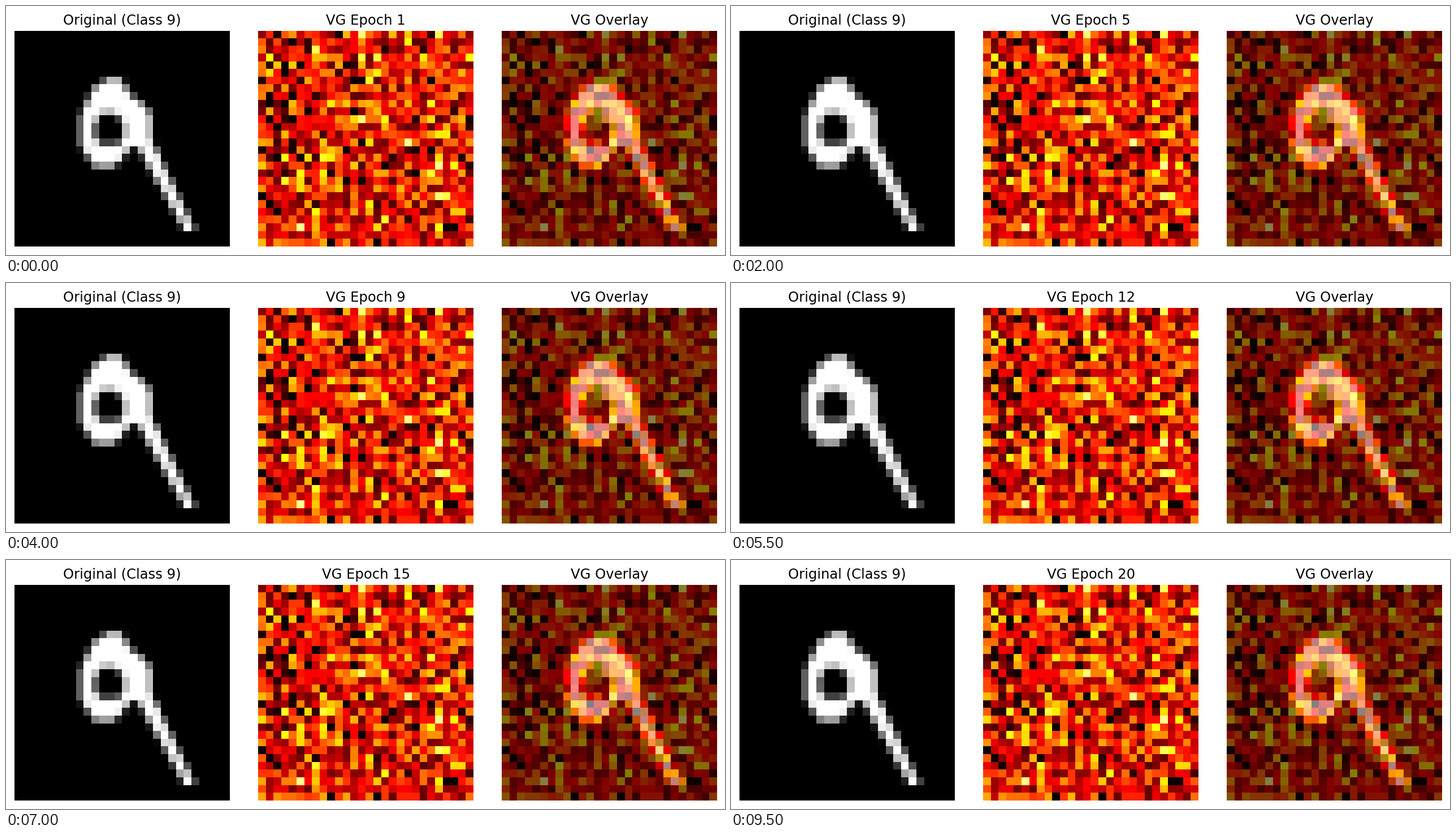
Recreate the animation shown at these times as a matplotlib script. Size 1272 by 440 pixels, loop 10 s.

```python
import numpy as np
import matplotlib.pyplot as plt
from matplotlib.animation import FuncAnimation
from matplotlib.path import Path

WIDTH, HEIGHT, DPI = 1272, 440, 100
EPOCHS, INTERVAL = 20, 500
GRID = 28
PANEL_X, PANEL_TOP, PANEL_SIZE = (14.9, 446.3, 877.2), 44.2, 381
LEVELS = 36  # colour steps of the gradient map

# Key points of the handwritten nine, in grid cells.
OUTLINE = [(12.3, 6.2), (13.8, 6.2), (15, 8.3), (17, 9.8), (17.8, 11),
           (17.7, 14), (23.5, 26), (22.2, 26), (16, 15), (15, 15.2),
           (13.7, 17), (12.8, 17.6), (10.4, 17.6), (8.65, 15), (8.65, 11),
           (10.3, 7.5)]
HOLE = [(11.3, 10.7), (13, 10.7), (14.25, 12), (14.25, 13.8), (13.6, 14.75),
        (11.1, 14.75), (10.4, 13.8), (10.4, 12)]


def coverage(points, samples=8):
    """Share of each grid cell that lies inside a polygon."""
    axis = (np.arange(GRID * samples) + 0.5) / samples
    x, y = np.meshgrid(axis, axis)
    inside = Path(points).contains_points(np.column_stack([x.flat, y.flat]))
    return inside.reshape(GRID, samples, GRID, samples).mean(axis=(1, 3))


digit = np.clip(coverage(OUTLINE) - coverage(HOLE), 0, 1)

rng = np.random.default_rng(9)
base = rng.normal(0.36, 0.2, (GRID, GRID))
drift = rng.normal(0, 0.02, (GRID, GRID))


def gradient_map(frame):
    """Noise that settles towards its final state as training goes on."""
    settled = 1 - np.exp(-frame / 6)
    values = np.clip(base + drift * settled, 0, 1)
    return np.round(values * LEVELS) / LEVELS


plt.rcParams["font.family"] = "DejaVu Sans"
fig = plt.figure(figsize=(WIDTH / DPI, HEIGHT / DPI), dpi=DPI,
                 facecolor="white")


def add_panel(x, title):
    ax = fig.add_axes([x / WIDTH, 1 - (PANEL_TOP + PANEL_SIZE) / HEIGHT,
                       PANEL_SIZE / WIDTH, PANEL_SIZE / HEIGHT])
    ax.axis("off")
    ax.set_title(title, fontsize=17.5, pad=8.4, y=1)
    return ax


def show(ax, data, cmap, alpha=1):
    return ax.imshow(data, cmap=cmap, vmin=0, vmax=1, alpha=alpha,
                     interpolation="nearest", aspect="auto")


titles = "Original (Class 9)", "VG Epoch 1", "VG Overlay"
digit_ax, map_ax, overlay_ax = map(add_panel, PANEL_X, titles)
show(digit_ax, digit, "gray")
show(overlay_ax, digit, "hot")
heat = show(map_ax, gradient_map(0), "hot")
overlay = show(overlay_ax, gradient_map(0), "hot", alpha=0.5)


def update(frame):
    values = gradient_map(frame)
    heat.set_data(values)
    overlay.set_data(values)
    map_ax.title.set_text(f"VG Epoch {frame + 1}")
    return heat, overlay, map_ax.title


animation = FuncAnimation(fig, update, frames=EPOCHS, interval=INTERVAL,
                          repeat=True, repeat_delay=0, blit=False)
plt.show()
```
